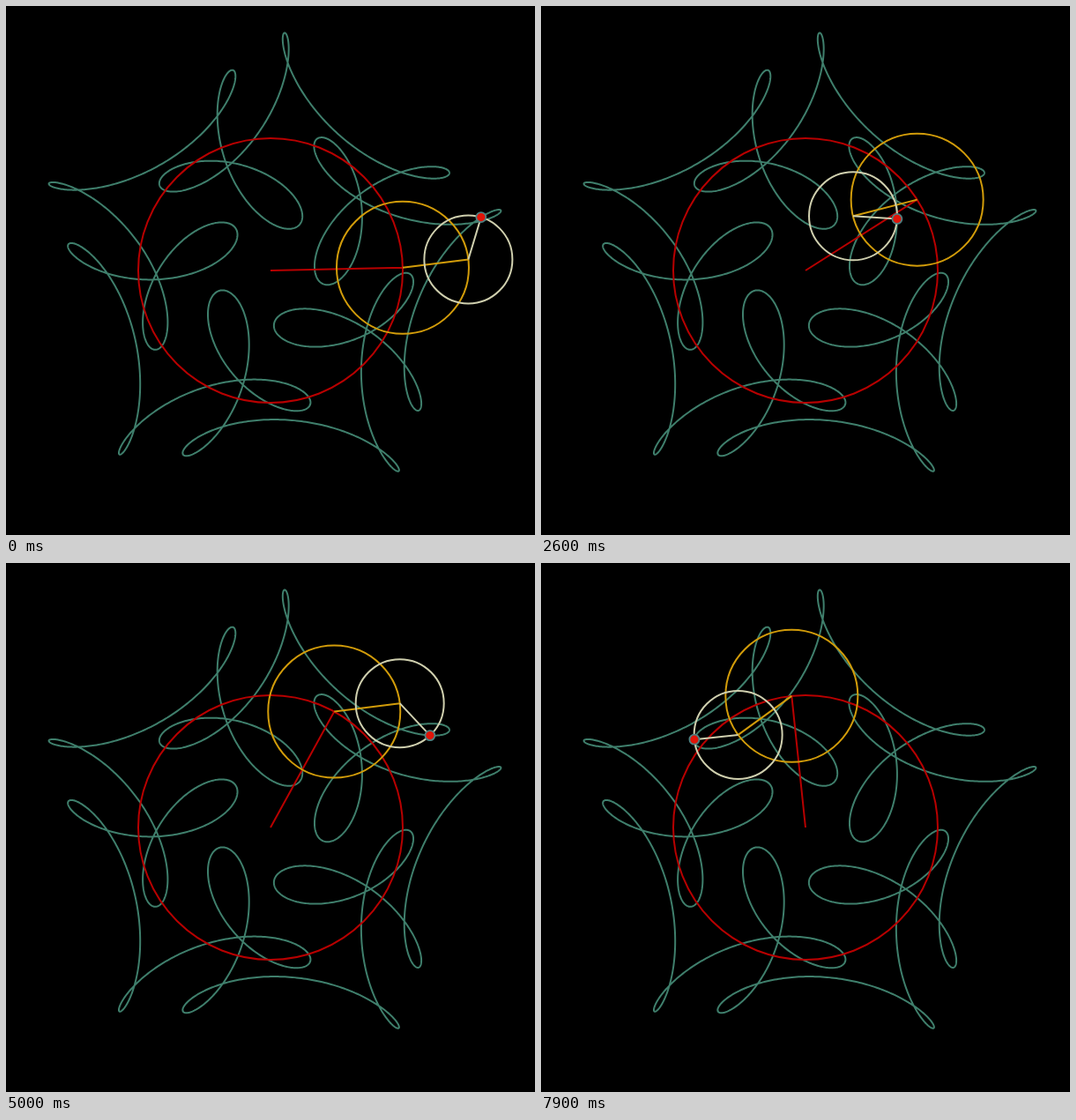
An HTML page with a canvas that plays this animation: 600x600 px, repeating every 8000 ms.

```html
<!DOCTYPE html>
<html lang="en">
<head>
<meta charset="utf-8">
<title>Epicycles</title>
<style>
  html, body { margin: 0; width: 100%; height: 100%; overflow: hidden; background: #000; }
  canvas { display: block; width: 600px; height: 600px; }
</style>
</head>
<body>
<canvas id="stage" width="600" height="600"></canvas>
<script>
const ctx = document.getElementById('stage').getContext('2d');
const TAU = 2 * Math.PI;
const CENTER = [300, 300];
const TURN_STEPS = 300, LOOP_STEPS = 80, STEP_MS = 100;

// Each arm: radius, turns per revolution, phase, colour
const arms = [
  { r: 150, n: 1, phase: 0, color: '#b80000' },
  { r: 75, n: 6, phase: 0, color: '#d29c0a' },
  { r: 50, n: -14, phase: TAU / 4, color: '#cfcfae' }
];

// Joint positions from the centre to the pen
function joints(a) {
  const pts = [CENTER];
  for (const { r, n, phase } of arms) {
    const [x, y] = pts[pts.length - 1];
    const angle = n * a + phase;
    pts.push([x + r * Math.cos(angle), y - r * Math.sin(angle)]);
  }
  return pts;
}

const curve = new Path2D();
for (let i = 0; i < 3000; i++) curve.lineTo(...joints(i / 3000 * TAU)[3]);
curve.closePath();

function draw(step) {
  const pts = joints((step + 1) / TURN_STEPS * TAU);
  ctx.fillStyle = '#000';
  ctx.fillRect(0, 0, 600, 600);
  ctx.lineWidth = 2;
  ctx.strokeStyle = '#3f7f6c';
  ctx.stroke(curve);

  arms.forEach(({ r, color }, i) => {
    ctx.strokeStyle = color;
    ctx.beginPath();
    ctx.arc(...pts[i], r, 0, TAU);
    ctx.moveTo(...pts[i]);
    ctx.lineTo(...pts[i + 1]);
    ctx.stroke();
  });

  ctx.beginPath();
  ctx.arc(...pts[3], 5.5, 0, TAU);
  ctx.fillStyle = '#e01408';
  ctx.fill();
  ctx.strokeStyle = '#4f7f80';
  ctx.lineWidth = 1.8;
  ctx.stroke();
}

const start = performance.now();
function tick() {
  const t = performance.now() - start;
  draw(Math.floor(t / STEP_MS) % LOOP_STEPS);
  requestAnimationFrame(tick);
}
tick();
</script>
</body>
</html>
```
